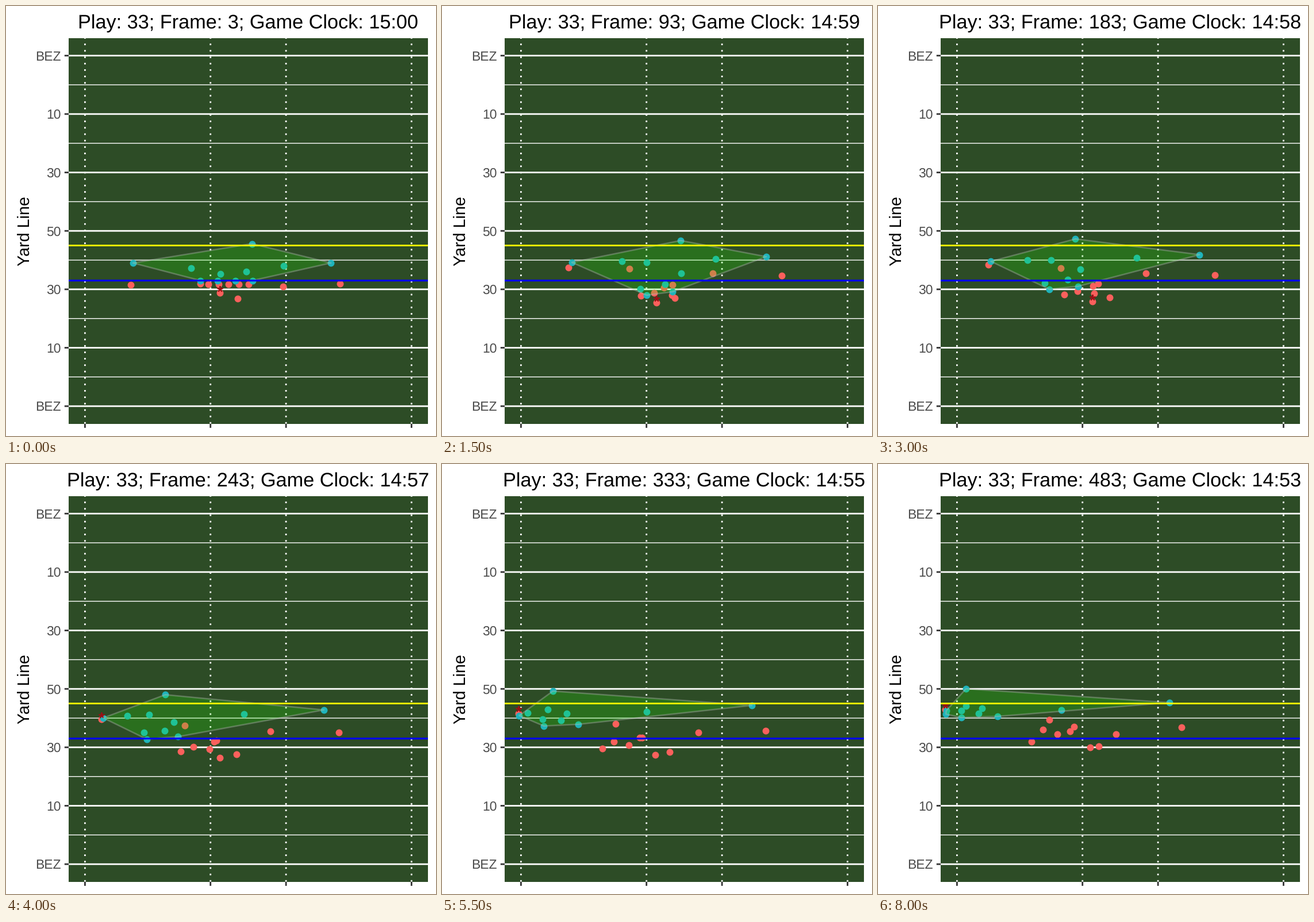
Recreate the animation shown at these times as a matplotlib script. Size 748x748 px, loop 8500 ms.

```python
import matplotlib.pyplot as plt
import numpy as np
from matplotlib.animation import FuncAnimation
from matplotlib.patches import Polygon

SIZE, DPI = 748, 64
PT = 72 / DPI  # points per pixel
STEPS, STEP_MS = 17, 500
RUSH_END, THROW, CATCH = 3, 6, 8

LEFT, RIGHT, TOP, BOTTOM = 109, 733.8, 55.8, 726.6
YARD = (BOTTOM - TOP) / 1.1 / 120
GOAL = TOP + 6 * YARD
SIDE = LEFT + (RIGHT - LEFT) * 0.05 / 1.1
GRID = 2.79

FIELD, RED, TEAL, BALL = "#2d4c26", "#fa605c", "#1fb4bb", "#9a1016"
HULL_FILL, HULL_EDGE = (0.12, 1, 0, 0.2), (0.74, 0.74, 0.74, 0.36)


def smooth(v):
    v = min(v / 0.9, 1)
    return v * v * (3 - 2 * v)


def quick(v):
    return smooth(v ** 0.8)


def trail(v):
    return v ** 1.7


class Squad:
    """Players who rush from a formation, then flow to the sideline together."""

    def __init__(self, start, rush, finish, ease_x, ease_y):
        self.start, self.rush, self.finish = map(np.array, (start, rush, finish))
        self.eases = ease_x, ease_y

    def at(self, step):
        u = min(step / RUSH_END, 1)
        v = max(0, (step - RUSH_END) / (STEPS - 1 - RUSH_END))
        flow = [ease(v) for ease in self.eases]
        return (self.start + (self.rush - self.start) * u
                + (self.finish - self.rush) * flow)


runner = Squad([(217, 485)], [(220, 455)], [(117, 427)], quick, smooth)
passer = Squad([(371.5, 499)], [(373, 516)], [(369, 492.5)], trail, trail)
wide = Squad([(581, 483), (481.5, 487.5), (402.5, 508.5)],
             [(591, 469), (471, 464.5), (405, 508)],
             [(528, 457.5), (414, 469.5), (384, 491)], trail, trail)
line = Squad([(352 + 17.5 * i, 484) for i in range(5)] + [(338, 482.5)],
             [(346, 504), (369, 499), (386, 490), (401, 485), (400, 503), (326, 457)],
             [(267, 483), (287, 462), (341, 457), (334, 465), (312, 470), (298, 445)],
             quick, trail)
front = Squad([(338 + 30.3 * i, 477.5) for i in range(4)],
              [(345, 492), (356, 503), (388, 484), (401, 497)],
              [(145, 428.5), (145, 441), (175, 434), (208, 439)], quick, smooth)
backs = Squad([(373, 465.5), (418, 462), (322, 455.5), (221, 447), (428, 413.5)],
              [(356, 446), (416, 464.5), (313, 444), (226, 446), (415, 408)],
              [(153, 421), (181, 425), (119, 429), (118, 435), (153, 391)], quick, smooth)
slot = Squad([(483, 452)], [(476, 439.5)], [(319, 428)], smooth, smooth)
corner = Squad([(565, 447)], [(564, 436)], [(506.5, 415)], trail, smooth)

OFFENSE = [runner, passer, wide, line]
DEFENSE = [front, backs, slot, corner]


def team_at(squads, step):
    return np.vstack([squad.at(step) for squad in squads])


def ball_at(step):
    flight = np.clip((step - THROW) / (CATCH - THROW), 0, 1)
    return (1 - flight) * passer.at(step)[0] + flight * runner.at(step)[0]


def convex_hull(points):
    def chain(pts):
        out = []
        for p in pts:
            while len(out) > 1:
                a, b = out[-2], out[-1]
                if (b[0] - a[0]) * (p[1] - a[1]) > (b[1] - a[1]) * (p[0] - a[0]):
                    break
                out.pop()
            out.append(p)
        return out[:-1]

    pts = sorted(map(tuple, points))
    return chain(pts) + chain(pts[::-1])


def title_text(step):
    left = 900 - max(0, (step - 1) // 2)
    return (f"Play: 33; Frame: {3 + 30 * step}; "
            f"Game Clock: {left // 60}:{left % 60:02d}")


plt.rcParams["font.family"] = "Liberation Sans"
plt.rcParams["text.hinting"] = "none"
fig = plt.figure(figsize=(SIZE / DPI, SIZE / DPI), dpi=DPI, facecolor="white")

page = fig.add_axes([0, 0, 1, 1])
page.set(xlim=(0, SIZE), ylim=(SIZE, 0))
page.axis("off")

field = fig.add_axes([LEFT / SIZE, 1 - BOTTOM / SIZE,
                      (RIGHT - LEFT) / SIZE, (BOTTOM - TOP) / SIZE])
field.set(xlim=(LEFT, RIGHT), ylim=(BOTTOM, TOP), xticks=[], yticks=[], facecolor=FIELD)
for spine in field.spines.values():
    spine.set_visible(False)


def across(y, color, width, z):
    field.plot([LEFT, RIGHT], [y, y], color=color, lw=width * PT, snap=False, zorder=z)


def tick(xs, ys):
    page.plot(xs, ys, color="#333333", lw=GRID * PT, solid_capstyle="butt", snap=False)


LABELS = ["BEZ", "10", "30", "50", "30", "10", "BEZ"]
for n, label in enumerate(LABELS):
    y = GOAL + 20 * YARD * n
    across(y, "white", GRID, 1)
    if n < len(LABELS) - 1:
        across(y + 10 * YARD, "white", GRID / 2, 1)
    tick([101.8, LEFT], [y, y])
    page.text(96, y + 8.3, label, size=22.9 * PT, color="#4d4d4d", ha="right", va="baseline")

for x in (SIDE, 355.7, 487.1, LEFT + RIGHT - SIDE):
    field.plot([x, x], [BOTTOM, TOP], color="white", lw=GRID * PT, ls=(0, (1, 3)),
               snap=False, zorder=1)
    tick([x, x], [BOTTOM, BOTTOM + 7.2])

across(GOAL + 65 * YARD, "yellow", 2.8, 5)
across(GOAL + 77 * YARD, "blue", 3.2, 5)

page.text(40.5, 391.5, "Yard Line", size=28.7 * PT, rotation=90,
          rotation_mode="anchor", ha="center", va="baseline")
title = page.text(421.2, 39.3, "", size=34.25 * PT, ha="center", va="baseline")

DOT = (11.9 * PT) ** 2
offense = field.scatter([], [], s=DOT, color=RED, lw=0, zorder=2)
defense = field.scatter([], [], s=DOT, color=TEAL, lw=0, zorder=2.2)
ball, = field.plot([], [], marker=(5, 2, 0), ms=10.5 * PT, mew=2.1 * PT,
                   color=BALL, zorder=2.5)
hull = Polygon([(0, 0)] * 3, facecolor=HULL_FILL, edgecolor=HULL_EDGE,
               lw=2.6 * PT, joinstyle="round", zorder=3)
field.add_patch(hull)


def draw(step):
    defenders = team_at(DEFENSE, step)
    offense.set_offsets(team_at(OFFENSE, step))
    defense.set_offsets(defenders)
    hull.set_xy(convex_hull(defenders))
    x, y = ball_at(step)
    ball.set_data([x], [y - 7.3])
    title.set_text(title_text(step))
    return offense, defense, hull, ball, title


anim = FuncAnimation(fig, draw, frames=STEPS, interval=STEP_MS, repeat=True, repeat_delay=0)
plt.show()
```
